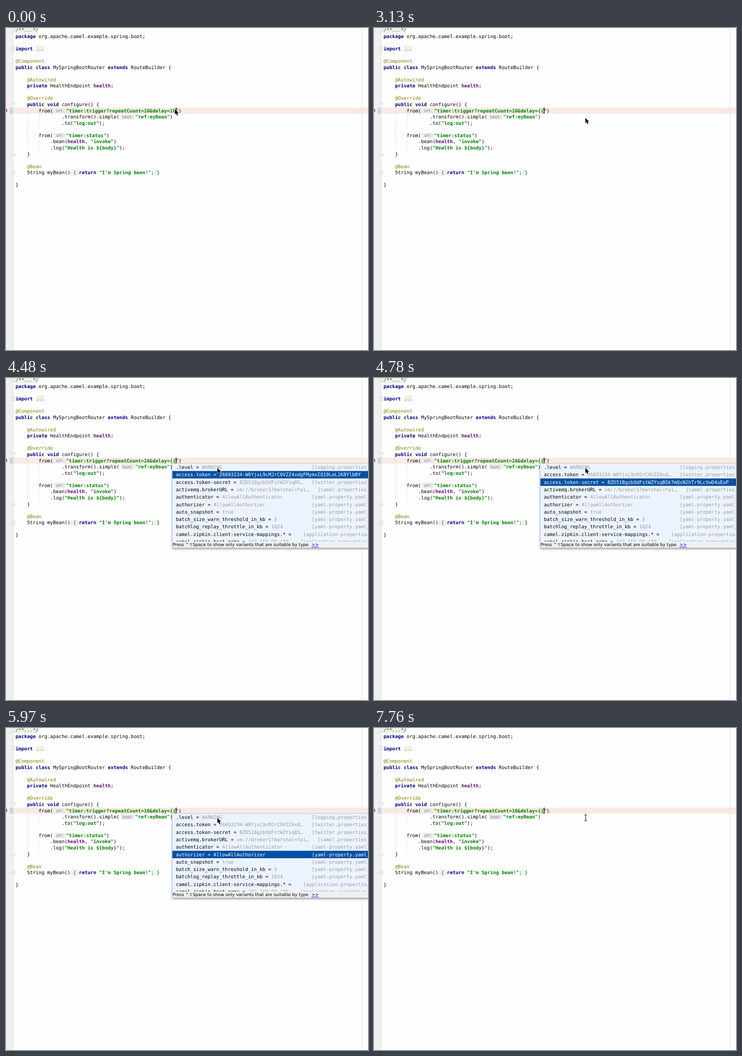
An HTML page that plays this animation: 794x705 px, repeating every 8 s.

```html
<!DOCTYPE html>
<html lang="en">
<head>
<meta charset="utf-8">
<title>Code completion</title>
<style>
  html, body { margin: 0; width: 100%; height: 100%; overflow: hidden; background: #fefefe; }
  svg { display: block; width: 794px; height: 705px; }
  text { font: 10.5px "DejaVu Sans Mono", monospace; white-space: pre; text-rendering: geometricPrecision; }
  .keyword { font-weight: bold; fill: #000080; }
  .string { font-weight: bold; fill: #008000; }
  .field { font-weight: bold; fill: #660e7a; }
  .note { fill: #808000; }
  .fold { fill: #414d41; }
  .doc { fill: #414d41; font-style: italic; }
  .hint { font: 9.5px "DejaVu Sans", sans-serif; fill: #7c7c7c; }
  .foot { font: 9.5px "DejaVu Sans", sans-serif; }
  .row text { font-size: 10.53px; }
  .dim { fill: #9b9b9b; }
  .bar, .full { display: none; }
  .on .bar, .on .full { display: inline; }
  .on .short { display: none; }
  .on text, .on .dim { fill: #fff; }
  .guide { stroke: #cfcfcf; stroke-dasharray: 1 1; }
  .marker { fill: #fefefe; stroke: #c9c9c9; }
</style>
</head>
<body>
<svg viewBox="0 0 794 705">
  <defs>
    <clipPath id="list"><rect x="364" y="187" width="430" height="171.3"/></clipPath>
    <filter id="blur" x="-5%" y="-10%" width="110%" height="125%"><feGaussianBlur stdDeviation="2.4"/></filter>
  </defs>
  <rect width="794" height="705" fill="#fefefe"/>
  <rect width="15" height="705" fill="#f0f0f0"/>
  <path d="M15.5 0V705" stroke="#dcdcdc"/>
  <rect x="16" y="174.2" width="778" height="13.4" fill="#f9e9e5"/>
  <path d="M780.5 0V705" stroke="#e0e0e0"/>
  <rect x="8" y="174.2" width="7.5" height="13.4" fill="#c3d6e8"/>
  <circle cx="-2.3" cy="180.8" r="5.2" fill="#db5c58"/>
  <path class="guide" d="M47.5 175V269M72.5 188V215M72.5 242V269"/>
  <g id="markers"></g>
  <g id="code"></g>
  <g id="typed"></g>
  <rect id="caret" y="174.2" width="1.6" height="13.3"/>
  <g id="bulb">
    <path d="M33.5 172.3a4 4 0 0 1 2.3 7.3l-.5 2.4h-3.6l-.5-2.4a4 4 0 0 1 2.3-7.3z" fill="#f5c64a" stroke="#c9962b" stroke-width=".6"/>
    <path d="M31.7 183h3.6M32 184.7h3" stroke="#777"/>
  </g>
  <g id="popup">
    <rect x="365" y="191" width="440" height="183" fill="#000" opacity=".45" filter="url(#blur)"/>
    <rect x="364.5" y="187" width="440" height="184.8" fill="#ebf4fe" stroke="#b4b8bd" stroke-width=".8"/>
    <g id="rows" clip-path="url(#list)"></g>
    <rect x="364.9" y="358.3" width="440" height="13.1" fill="#f0f0f0"/>
    <text class="foot" x="365.5" y="368.4">Press ^⇧Space to show only variants that are suitable by type</text>
    <text class="foot" x="670" y="368.4" fill="#00f" text-decoration="underline">&gt;&gt;</text>
  </g>
  <path id="arrow" d="M1.6 .9V12.3L4.2 9.9L6.1 14.4L8.2 13.5L6.3 9.1H9.9Z" stroke="#fff" stroke-width="1.1" paint-order="stroke"/>
  <path id="beam" d="M461.2 189.8Q464.2 189.8 464.2 192V201.6Q464.2 203.8 461.2 203.8M467.2 189.8Q464.2 189.8 464.2 192M464.2 201.6Q464.2 203.8 467.2 203.8M462.6 198.8H465.8" fill="none" stroke="#222" stroke-width="1.1"/>
</svg>
<script>
const $ = id => document.getElementById(id);
const ADVANCE = 6.3215, LEFT = 21, LINE = 13.56, FIRST_TOP = -2.08;
const HINT_WIDTH = { 'uri:': 15.8, 'text:': 22.1 };

const escape = s => s.replace(/&/g, '&amp;').replace(/</g, '&lt;');
const text = (x, y, kind, s) => `<text class="${kind}" x="${x}" y="${y}">${escape(s)}</text>`;
const lineTop = line => FIRST_TOP + line * LINE;

// Lays out alternating kind/text pairs from x along one editor line.
function runs(line, x, ...parts) {
  const top = lineTop(line), base = top + 10.4;
  let out = '';
  for (let i = 0; i < parts.length; i += 2) {
    const kind = parts[i], s = parts[i + 1];
    if (kind === 'hint') {
      const w = HINT_WIDTH[s];
      out += `<rect x="${x + 3}" y="${top + .9}" width="${w + 8}" height="11.8" rx="3" fill="#ebebeb"/>`;
      out += text(x + 6.8, base - .6, kind, s);
      x += w + 12.8;
      continue;
    }
    const w = s.length * ADVANCE;
    if (kind === 'fold' || kind === 'doc')
      out += `<rect x="${x}" y="${top}" width="${w}" height="13.4" fill="#e9f5e6"/>`;
    out += text(x, base, kind, s);
    x += w;
  }
  return out;
}
const code = (line, col, ...parts) => runs(line, LEFT + col * ADVANCE, ...parts);

$('code').innerHTML = [
  code(0, 0, 'doc', '/**...*/'),
  code(1, 0, 'keyword', 'package ', '', 'org.apache.camel.example.spring.boot;'),
  code(3, 0, 'keyword', 'import ', 'fold', '...'),
  code(5, 0, 'note', '@Component'),
  code(6, 0, 'keyword', 'public class ', '', 'MySpringBootRouter ', 'keyword', 'extends ', '', 'RouteBuilder {'),
  code(8, 4, 'note', '@Autowired'),
  code(9, 4, 'keyword', 'private ', '', 'HealthEndpoint ', 'field', 'health', '', ';'),
  code(11, 4, 'note', '@Override'),
  code(12, 4, 'keyword', 'public void ', '', 'configure() {'),
  code(13, 8, '', 'from(', 'hint', 'uri:', 'string', '"timer:trigger?repeatCount=10&delay='),
  code(14, 16, '', '.transform().simple(', 'hint', 'text:', 'string', '"ref:myBean"', '', ')'),
  code(15, 16, '', '.to(', 'string', '"log:out"', '', ');'),
  code(17, 8, '', 'from(', 'hint', 'uri:', 'string', '"timer:status"', '', ')'),
  code(18, 12, '', '.bean(', 'field', 'health', '', ', ', 'string', '"invoke"', '', ')'),
  code(19, 12, '', '.log(', 'string', '"Health is ${body}"', '', ');'),
  code(20, 4, '', '}'),
  code(22, 4, 'note', '@Bean'),
  code(23, 4, '', 'String myBean()', 'fold', ' { ', 'keyword', 'return ', 'string', '"I\'m Spring bean!"', '', ';', 'fold', ' }'),
  code(25, 0, '', '}')
].join('');

const plus = y => `<path class="marker" d="M11.5 ${y - 4}h8v8h-8zM13.5 ${y}h4M15.5 ${y - 2}v4"/>`;
const bracket = (y, dir) =>
  `<path class="marker" d="M11.5 ${y - 4 * dir}h8v${5 * dir}l-4 ${3.5 * dir}l-4 ${-3.5 * dir}zM13.5 ${y - dir}h4"/>`;
$('markers').innerHTML = plus(4.5) + plus(44.5) + plus(316.5) + bracket(167.5, 1) + bracket(275.5, -1);

// key, shown value, file, and the long value a selected row reveals
const ENTRIES = [
  ['.level', 'WARNING', 'logging.properties]'],
  ['access.token', '26693234-W0YjxL9cMJrC0VZZ4xd…', 'twitter.properties]', '26693234-W0YjxL9cMJrC0VZZ4xdgFMymxIQ10LeL1K8YlbBY'],
  ['access.token-secret', 'BZD51BgzbOdFstWZYsqB5…', 'twitter.properties]', 'BZD51BgzbOdFstWZYsqB5k7mQxN2hTr9LcVwD4uEoP'],
  ['activemq.brokerURL', 'vm://broker1?marshal=fal…', 'camel.properties]', 'vm://broker1?marshal=false&broker.persistent=false'],
  ['authenticator', 'AllowAllAuthenticator', 'yaml-property.yaml]'],
  ['authorizer', 'AllowAllAuthorizer', 'yaml-property.yaml]'],
  ['auto_snapshot', 'true', 'yaml-property.yaml]'],
  ['batch_size_warn_threshold_in_kb', '5', 'yaml-property.yaml]'],
  ['batchlog_replay_throttle_in_kb', '1024', 'yaml-property.yaml]'],
  ['camel.zipkin.client-service-mappings.*', '', 'application.propertie…'],
  ['camel.zipkin.host-name', '192.168.99.100', 'application.properties]']
];
const ROW = 16.3, ROW_ADVANCE = 6.34;
$('rows').innerHTML = ENTRIES.map(([key, value, file, long], i) => {
  const top = 187.3 + i * ROW, base = top + 11.7, x = 372.7;
  const valueX = x + (key.length + 3) * ROW_ADVANCE;
  const fileX = 797.6 - (file.length + 1) * ROW_ADVANCE;
  const short = long ? 'dim short' : 'dim';
  return `<g class="row"><rect class="bar" x="365" y="${top}" width="429" height="${ROW}" fill="#0550a5"/>`
    + text(x, base, '', key + ' =') + text(valueX, base, short, value) + text(fileX, base, short, '[' + file)
    + (long ? text(valueX, base, 'full', long) : '') + '</g>';
}).join('');
const rows = [...$('rows').children];

// Each track lists [start time, value]; a value holds until the next one.
const TRACKS = {
  typed: [[0, '10'], [890, '1'], [1040, ''], [2080, '{'], [2380, '{{']],
  arrow: [[0, [369, 177]], [290, [431, 193]], [440, [462, 196]], [2080, null], [3130, [462, 196]], [7460, null]],
  caret: [[0, true], [3580, false], [4030, true], [5520, false], [5970, true], [6560, false], [7010, true], [7460, false], [7760, true]],
  bulb: [[0, false], [3430, true], [4480, false]],
  selected: [[0, -1], [3280, 0], [4480, 1], [4780, 2], [4930, 3], [5070, 4], [5220, 5], [6270, 6], [6710, 7], [7460, -1]]
};
const at = (name, t) => TRACKS[name].findLast(([start]) => start <= t)[1];
const show = (id, on) => { $(id).style.display = on ? 'inline' : 'none'; };

const TYPED_X = 359.6;
let lastTyped = null;
function draw(t) {
  const typed = at('typed', t), arrow = at('arrow', t), selected = at('selected', t);
  if (typed !== lastTyped) {
    $('typed').innerHTML = runs(13, TYPED_X, 'string', typed + '"', '', ')');
    $('caret').setAttribute('x', TYPED_X + typed.length * ADVANCE + .1);
    lastTyped = typed;
  }
  show('caret', at('caret', t));
  show('bulb', at('bulb', t));
  show('popup', selected >= 0);
  rows.forEach((row, i) => row.classList.toggle('on', i === selected));
  show('arrow', arrow);
  show('beam', !arrow);
  if (arrow) $('arrow').setAttribute('transform', `translate(${arrow})`);
}

const began = performance.now();
function tick() {
  draw((performance.now() - began) % 8000);
  requestAnimationFrame(tick);
}
tick();
</script>
</body>
</html>
```
